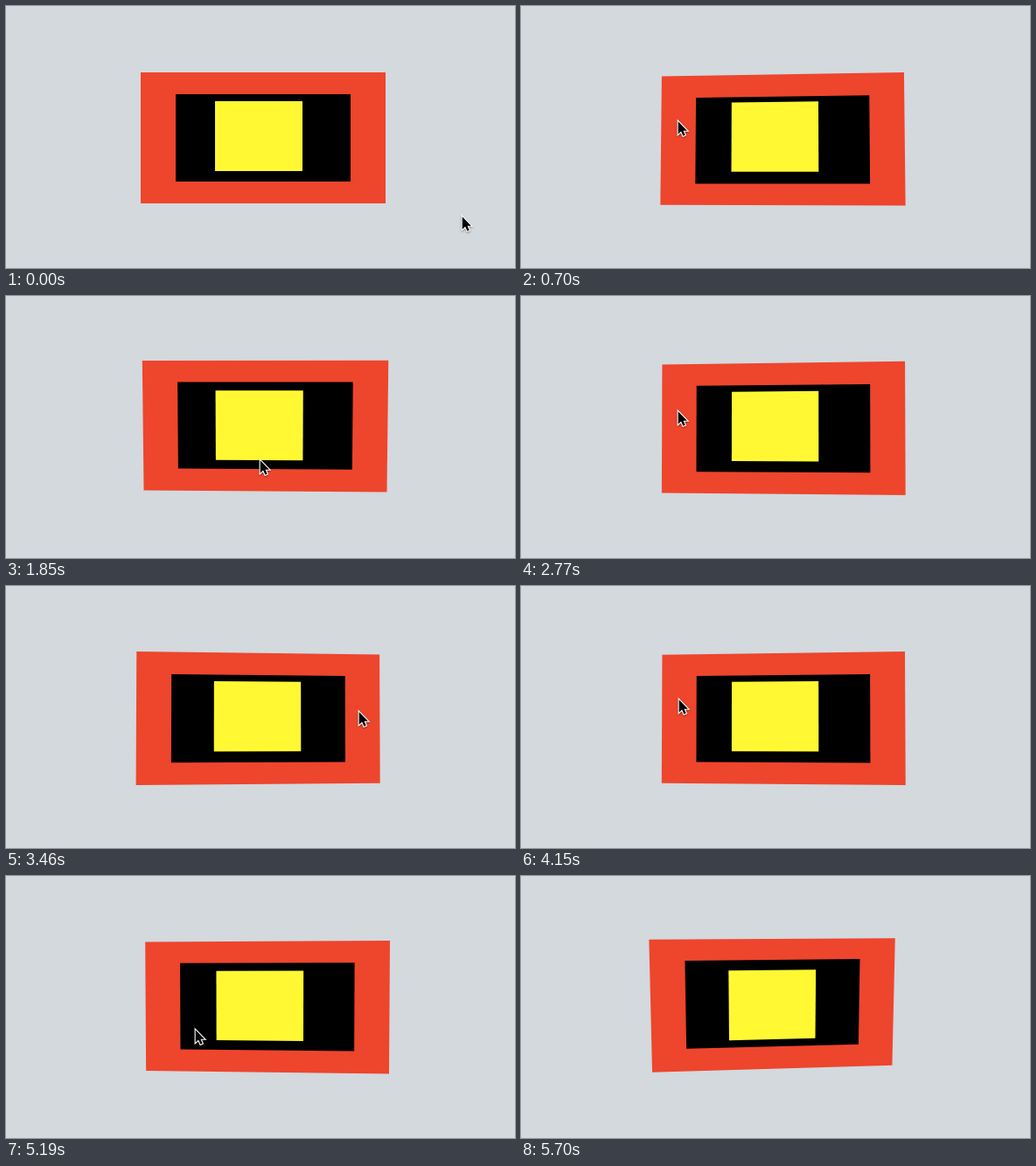
Write an HTML page with a canvas that moves like this. It is 582 px wide and 300 px high and loops after 6.21 s.

```html
<!DOCTYPE html>
<html lang="en">
<head>
<meta charset="utf-8">
<title>Tilting layers</title>
<style>
  html, body { margin: 0; width: 100%; height: 100%; overflow: hidden; background: #d3d9dd; }
  canvas { display: block; }
</style>
</head>
<body>
<canvas id="stage" width="582" height="300"></canvas>
<script>
const ctx = document.getElementById('stage').getContext('2d');
const LOOP = 6210, PERSPECTIVE = 800;
const START = 110, STEP = 58.23;
const ORBIT_START = 430, ORBIT_END = 5176, LEAVE = 5555, HIDE = 5690;
const TILT_LAG = 30;
const orbit = { x: 290, y: 140, rx: 113, ry: 47 };

// shift is the distance a layer moves away from the pointer at full tilt
const layers = [
  { x: 294, y: 151, w: 280, h: 150, shift: 4.1, color: '#ee452d' },
  { x: 294, y: 151, w: 200, h: 100, shift: 5.4, color: '#000' },
  { x: 289, y: 149, w: 100, h: 80, shift: 1.5, color: '#fff833' }
];

// quick turns one way, slower turns back, then a short reversal: time, degrees
const turns = [
  [ORBIT_START, -90], [1158, 380], [1857, 900], [2030, 1005],
  [4128, 436.5], [5125, 118], [ORBIT_END, 139]
];

const clamp = (v, lo, hi) => Math.min(hi, Math.max(lo, v));

function heldTime(t) {
  return t < START ? 0 : START + STEP * Math.floor((t - START) / STEP + 0.35);
}

function onOrbit(t) {
  const i = Math.max(1, turns.findIndex(turn => turn[0] >= t));
  const [t0, a0] = turns[i - 1], [t1, a1] = turns[i];
  const angle = (a0 + (a1 - a0) * (t - t0) / (t1 - t0)) * Math.PI / 180;
  return { x: orbit.x - orbit.rx * Math.sin(angle), y: orbit.y - orbit.ry * Math.cos(angle) };
}

function onCurve(a, b, c, u) {
  const mix = axis => (1 - u) ** 2 * a[axis] + 2 * u * (1 - u) * b[axis] + u * u * c[axis];
  return { x: mix('x'), y: mix('y') };
}

function pointerAt(t) {
  if (t < ORBIT_START) {
    const u = Math.max(0, (t - START) / (ORBIT_START - START));
    return onCurve({ x: 521, y: 240 }, { x: 470, y: 265 }, onOrbit(ORBIT_START), u);
  }
  if (t <= ORBIT_END) return onOrbit(t);
  const u = Math.min(1, (t - ORBIT_END) / (HIDE - ORBIT_END));
  return onCurve(onOrbit(ORBIT_END), { x: 395, y: 160 }, { x: 467, y: 270 }, u);
}

function tiltAt(t) {
  const p = pointerAt(Math.min(t - TILT_LAG, LEAVE));
  if (p.x > 434 || p.y > 226) return { x: 0, y: 0 };
  return {
    x: clamp((p.x - 294) / 140, -0.93, 0.93),
    y: clamp((p.y - 149) / 75, -0.93, 0.93)
  };
}

function drawLayer(layer, tilt) {
  const sinY = 0.14 * tilt.x, sinX = 0.145 * tilt.y;
  const cosY = Math.sqrt(1 - sinY * sinY), cosX = Math.sqrt(1 - sinX * sinX);
  ctx.beginPath();
  for (const [sx, sy] of [[-1, -1], [1, -1], [1, 1], [-1, 1]]) {
    const x = sx * layer.w / 2, y = sy * layer.h / 2;
    const scale = PERSPECTIVE / (PERSPECTIVE + x * sinY + y * sinX);
    ctx.lineTo(
      layer.x - layer.shift * tilt.x + x * cosY * scale,
      layer.y - layer.shift * tilt.y + (y * cosX - x * sinX * sinY) * scale
    );
  }
  ctx.fillStyle = layer.color;
  ctx.fill();
}

const arrow = new Path2D('M0 0V14.5L3.4 11.4L5.7 16.5L8 15.5L5.8 10.5H10.2Z');

function drawPointer({ x, y }) {
  ctx.save();
  ctx.translate(Math.round(x) + 0.7, Math.round(y) + 1.2);
  ctx.lineWidth = 2.2;
  ctx.strokeStyle = '#fff';
  ctx.shadowColor = 'rgba(0, 0, 0, 0.4)';
  ctx.shadowBlur = 2;
  ctx.shadowOffsetY = 1;
  ctx.stroke(arrow);
  ctx.shadowColor = 'transparent';
  ctx.fillStyle = '#000';
  ctx.fill(arrow);
  ctx.restore();
}

function draw(now) {
  const t = heldTime(now % LOOP);
  ctx.fillStyle = '#d3d9dd';
  ctx.fillRect(0, 0, 582, 300);
  const tilt = tiltAt(t);
  layers.forEach(layer => drawLayer(layer, tilt));
  if (t < HIDE) drawPointer(pointerAt(t));
}

const begin = performance.now();
function tick() {
  draw(performance.now() - begin);
  requestAnimationFrame(tick);
}
tick();
</script>
</body>
</html>
```
